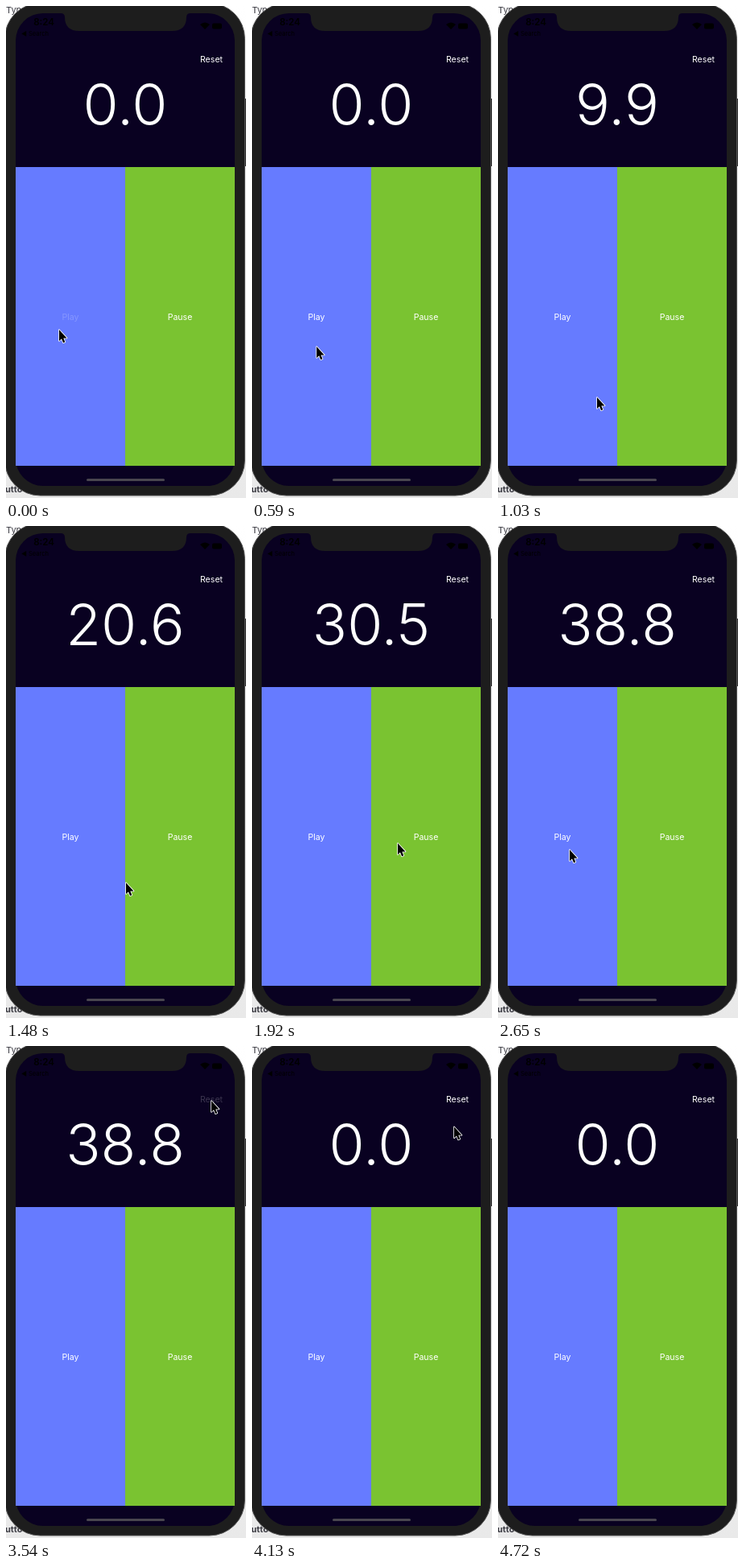
These frames come from a looping animation (298 by 611 pixels, 5.3 s). An HTML page:

```html
<!DOCTYPE html>
<html lang="en">
<head>
<meta charset="utf-8">
<title>Stopwatch</title>
<style>
  html, body { margin: 0; width: 100%; height: 100%; overflow: hidden; background: #f4f4f4; }
  svg { display: block; width: 100%; height: 100%; }
  text { font-family: Inter, "Liberation Sans", sans-serif; }
  .label { font-size: 10.6px; fill: #fff; text-anchor: middle; }
  .page { font-size: 11px; fill: #3c3c44; }
  #time { font-size: 71.5px; font-weight: 360; fill: #fff; text-anchor: middle; }
</style>
</head>
<body>
<svg viewBox="0 0 298 611">
  <linearGradient id="paper" x2="0" y2="1">
    <stop stop-color="#fff"/>
    <stop offset="1" stop-color="#e9e9e9"/>
  </linearGradient>
  <rect width="298" height="611" fill="url(#paper)"/>
  <text class="page" x="0" y="9">Typ</text>
  <text class="page" x="-1" y="604" font-weight="700">utto</text>
  <path d="M296 115h2v84h-2z" fill="#333"/>

  <rect x="-1.500" y="-3.500" width="298" height="611.500" rx="44" fill="#1d1d1d" stroke="#555"/>
  <rect x="12" y="9" width="272" height="587" rx="34" fill="#090121"/>
  <path d="M68 9Q73 9 73 14Q73 31 91 31H206Q224 31 224 14Q224 9 229 9Z" fill="#1d1d1d"/>

  <g fill="#000">
    <text x="47" y="24" font-size="11.5" font-weight="600" text-anchor="middle">8:24</text>
    <text x="19" y="37" font-size="7.5">◀ Search</text>
    <path d="M241 23Q247 18 253 23L247 29z"/>
    <rect x="256" y="21.500" width="12" height="7" rx="2"/>
  </g>

  <path d="M12 200H148V571H12z" fill="#667bff"/>
  <path d="M148 200H284V571H148z" fill="#7ac331"/>
  <rect x="100" y="587" width="97" height="3" rx="1.500" fill="#49464f"/>

  <text id="time" x="148" y="147.500">0.0</text>
  <text class="label" id="reset" x="255" y="70">Reset</text>
  <text class="label" id="play" x="80" y="390">Play</text>
  <text class="label" id="pause" x="216" y="390">Pause</text>

  <path id="cursor" d="M1 1V15L4 12.200L6.100 17.200L8.300 16.200L6.300 11.400H10.500Z"
        fill="#000" stroke="#fff" stroke-width="1.600" stroke-linejoin="round" paint-order="stroke"/>
</svg>
<script>
const LOOP = 5300, STEP = 147.5, RESET = 25, GONE = 32;
const LAP_START = 4, LAP_STEPS = 3, laps = [0, 9.9, 20.6, 30.5, 38.8];
const $ = id => document.getElementById(id);
const mix = (a, b, t) => a + (b - a) * t;
const clamp = (v, low, high) => Math.min(high, Math.max(low, v));

const linear = t => t;
const easeIn = t => t ** 3;
const easeOut = t => 1 - (1 - t) ** 4;

// The pointer's stops: arrival step, position, way of getting there
const route = [
  [3, 65, 401], [7, 122, 485], [10, 148, 442], [13, 180, 393], [16, 225, 390],
  [18, 88, 401], [23, 254, 67, easeOut], [26, 254, 67], [31, 191, 572, easeIn]
];

function pointer(step) {
  const next = clamp(route.findIndex(stop => stop[0] >= step), 1, route.length - 1);
  const [from, x0, y0] = route[next - 1];
  const [to, x1, y1, ease = linear] = route[next];
  const t = ease(clamp((step - from) / (to - from), 0, 1));
  return [mix(x0, x1, t), mix(y0, y1, t)];
}

function seconds(step) {
  if (step >= RESET) return 0;
  const lap = clamp((step - LAP_START) / LAP_STEPS, 0, laps.length - 1);
  return mix(laps[Math.floor(lap)], laps[Math.ceil(lap)], lap % 1);
}

function draw(now) {
  const step = Math.floor((now % LOOP + 5) / STEP);
  const fade = (id, pressed) => $(id).style.opacity = pressed ? 0.2 : 1;
  fade("play", step < LAP_START);
  fade("pause", step === 16);
  fade("reset", step === RESET - 1);
  $("time").textContent = seconds(step).toFixed(1);
  $("cursor").style.visibility = step < GONE ? "visible" : "hidden";
  $("cursor").setAttribute("transform", `translate(${pointer(step)})`);
}

let start;
function tick(now) {
  start ??= now;
  draw(now - start);
  requestAnimationFrame(tick);
}
draw(0);
requestAnimationFrame(tick);
</script>
</body>
</html>
```
